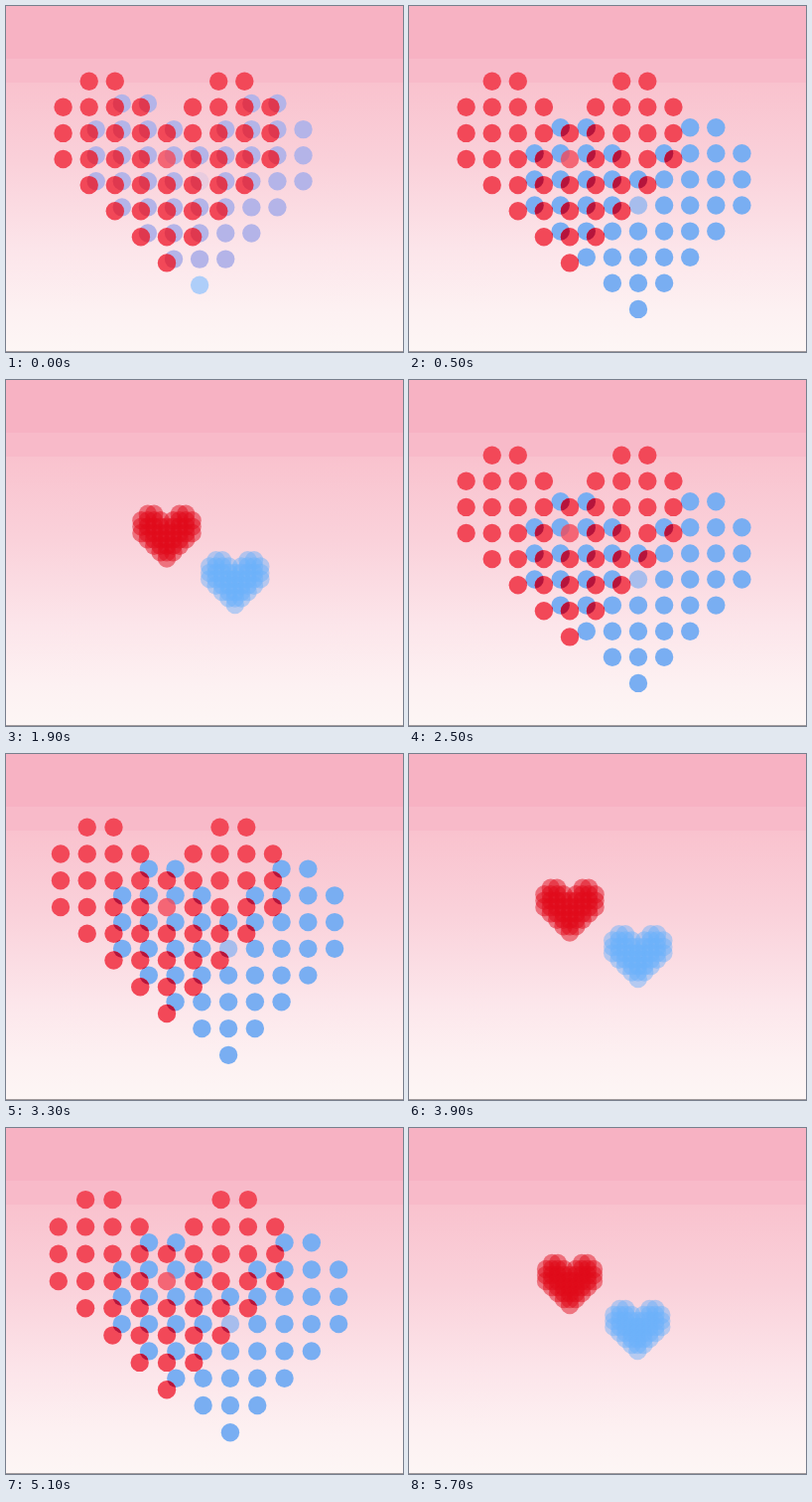
Recreate the animation shown at these times as an HTML page. Size 400x348 px, loop 5.8 s.

```html
<!DOCTYPE html>
<html lang="en">
<head>
<meta charset="utf-8">
<title>Two dotted hearts</title>
<style>
  html, body { margin: 0; width: 100%; height: 100%; overflow: hidden; }
  svg { display: block; width: 100vw; height: 100vh; }
</style>
</head>
<body>
<svg id="stage" viewBox="0 0 400 348" preserveAspectRatio="none">
  <defs>
    <linearGradient id="sky" gradientUnits="userSpaceOnUse" x1="0" y1="77" x2="0" y2="348">
      <stop offset="0" stop-color="#f9c2ce"/>
      <stop offset=".3" stop-color="#fad1da"/>
      <stop offset=".62" stop-color="#fce5ea"/>
      <stop offset=".85" stop-color="#fdf1f2"/>
      <stop offset="1" stop-color="#fdf6f5"/>
    </linearGradient>
    <clipPath id="blueShape"></clipPath>
  </defs>
  <rect width="400" height="348" fill="url(#sky)"/>
  <rect width="400" height="77" fill="#f8bac9"/>
  <rect width="400" height="53" fill="#f7b2c3"/>
  <rect y="347" width="400" height="1" fill="#a09a9c"/>
  <g id="blue"></g>
  <g id="red"></g>
  <g id="overlap" clip-path="url(#blueShape)" fill="#b5143c"></g>
</svg>
<script>
const LOOP = 5800, BEAT = 2000, STEP = 100;
const RADIUS = 9.2;
const HOME = { x: 162, y: 154 };
const SHIFT = { x: 69, y: 46.5 };

// Inner and outer column of each row, mirrored around the middle.
const ROWS = [[2, 3], [1, 4], [0, 4], [0, 4], [0, 3], [0, 2], [0, 1], [0, 0]];
const cells = ROWS.flatMap(([inner, outer], i) => {
  const row = [];
  for (let col = -outer; col <= outer; col++) {
    if (Math.abs(col) >= inner) row.push({ col, row: i - 3 });
  }
  return row;
});

// [time within a beat, value]
const SPACING = [
  [0, 7], [60, 6.5], [130, 15], [200, 24.3], [255, 26.1], [320, 27.1], [390, 27.4],
  [500, 26.1], [1000, 26.1], [1100, 27.3], [1180, 27.6], [1300, 26.75],
  [1400, 23.7], [1500, 17], [1600, 10], [1700, 6], [1800, 5.8], [2000, 7]
];
const SEPARATION = [
  [0, 0], [100, .05], [200, .28], [255, .48], [400, .9], [500, 1], [1000, 1],
  [1150, .89], [1200, .875], [1300, .9], [1400, .925], [1700, .99], [2000, 1]
];

const RED = { packed: [224, 10, 25], spread: [242, 72, 88] };
const BLUE = { packed: [108, 178, 250], spread: [121, 174, 242] };
const LAVENDER = [180, 180, 232], PALE_BLUE = [174, 206, 249];

const clamp = v => Math.min(1, Math.max(0, v));
const mix = (a, b, k) => a + (b - a) * k;
const blend = (a, b, k) => a.map((v, i) => mix(v, b[i], k));
const rgb = c => `rgb(${c.map(Math.round).join()})`;

function sample(points, t) {
  const i = Math.max(1, points.findIndex(p => p[0] >= t));
  const [t0, a] = points[i - 1], [t1, b] = points[i];
  return mix(a, b, (t - t0) / (t1 - t0));
}

function makeDots(id) {
  const parent = document.getElementById(id);
  return cells.map(() => {
    const dot = document.createElementNS("http://www.w3.org/2000/svg", "circle");
    dot.setAttribute("r", RADIUS);
    return parent.appendChild(dot);
  });
}

function place(dots, x, y, spacing) {
  dots.forEach((dot, i) => {
    dot.setAttribute("cx", x + cells[i].col * spacing);
    dot.setAttribute("cy", y + cells[i].row * spacing);
  });
}

function paint(dots, color, alpha, centerAlpha, tipColor = color) {
  dots.forEach((dot, i) => {
    const { col, row } = cells[i];
    const isCenter = col === 0 && row === 0;
    dot.setAttribute("fill", rgb(row === 4 ? tipColor : color));
    dot.setAttribute("fill-opacity", isCenter ? centerAlpha : alpha);
  });
}

const red = makeDots("red");
const blue = makeDots("blue");
const blueShape = makeDots("blueShape");
const overlap = makeDots("overlap");
const overlapGroup = document.getElementById("overlap");
const centerIndex = cells.findIndex(c => c.col === 0 && c.row === 0);
overlap[centerIndex].setAttribute("visibility", "hidden");

function draw(time) {
  // The loop opens with the hearts already parting.
  const beat = Math.max(time, 255 + .3 * time) % BEAT;
  const spacing = sample(SPACING, beat);
  const part = sample(SEPARATION, beat);
  const spread = clamp((spacing - 6) / 18);
  const fresh = 1 - clamp((beat - 255) / 195);
  const x = HOME.x + SHIFT.x * part, y = HOME.y + SHIFT.y * part;

  place(red, HOME.x, HOME.y, spacing);
  place(overlap, HOME.x, HOME.y, spacing);
  place(blue, x, y, spacing);
  place(blueShape, x, y, spacing);

  const alpha = mix(.48, 1, spread);
  const blueColor = blend(BLUE.packed, BLUE.spread, spread);
  paint(red, blend(RED.packed, RED.spread, spread), alpha, mix(.48, .78, spread));
  paint(blue, blend(blueColor, LAVENDER, fresh), alpha, mix(.65, .25, fresh),
    blend(blueColor, PALE_BLUE, fresh));
  overlapGroup.setAttribute("opacity", spread ** 4 * mix(1, .3, fresh));
}

const start = performance.now();
function tick() {
  const elapsed = (performance.now() - start) % LOOP;
  draw(Math.floor(elapsed / STEP) * STEP);
  requestAnimationFrame(tick);
}
tick();
</script>
</body>
</html>
```
